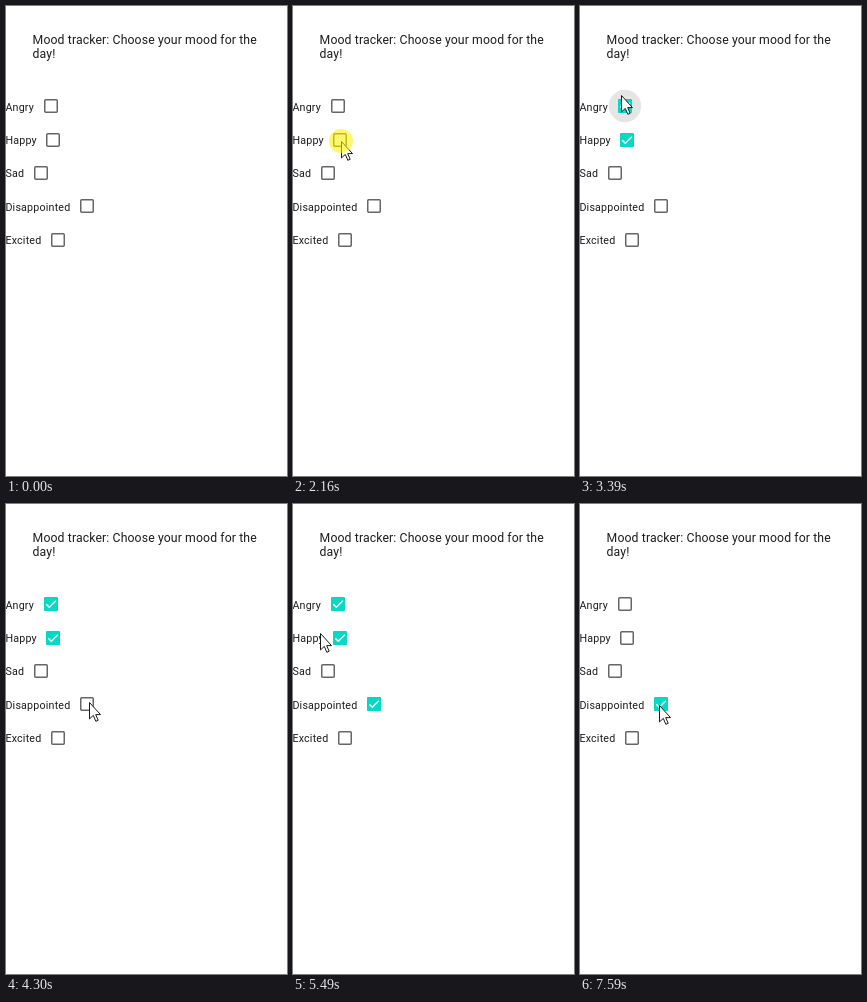
An HTML page for the animation above (8000 ms loop, 281 px wide and 470 px high).

```html
<!DOCTYPE html>
<html lang="en">
<head>
<meta charset="utf-8">
<title>Mood tracker</title>
<style>
  html, body { margin: 0; width: 100%; height: 100%; overflow: hidden; background: #fff; }
  svg { display: block; width: 281px; height: 470px; }
  text { font-family: Roboto, Arial, sans-serif; fill: #1c1c1c; }
  .title { font-size: 12.25px; letter-spacing: .009375em; }
  .label { font-size: 10.7px; letter-spacing: .01786em; }
</style>
</head>
<body>
<svg id="stage" viewBox="0 0 281 470">
  <rect width="281" height="470" fill="#fff"/>
  <text class="title" x="26.6" y="38">Mood tracker: Choose your mood for the</text>
  <text class="title" x="26.6" y="52">day!</text>
  <g id="rows"></g>
  <path id="cursor" d="M.5 .5V16.9L4.3 13.4 6.8 19.3 9.2 18.3 6.7 12.6H11.5Z"
        fill="#fff" stroke="#1a1a1a" stroke-linejoin="round"/>
  <circle id="glow" r="12" fill="#fff200" opacity=".58"/>
</svg>
<script>
const LOOP = 8000;
const PRESS = 140;        // press to toggle
const RIPPLE_END = 780;
const CHECK_LENGTH = 14;
const ROW = 33.35;

// label, checkbox centre x, press times
const moods = [
  ['Angry', 45, [3040, 5980]],
  ['Happy', 47, [2160, 6470]],
  ['Sad', 35, []],
  ['Disappointed', 81, [4510]],
  ['Excited', 52, []]
];

// time, x, y of the pointer tip; equal neighbours are rests
const path = [
  [1110, 10, 126], [1400, 57, 141], [1670, 48, 135], [2400, 48, 135],
  [2960, 41, 89], [3460, 41, 89], [3880, 58, 138], [4300, 83, 198],
  [4760, 83, 198], [5000, 66, 235], [5280, 19, 178], [5360, 18, 158],
  [5490, 27, 129], [5770, 41, 97], [6200, 41, 97], [6400, 46, 128],
  [6680, 46, 128], [7300, 84, 199], [7440, 84, 199], [7590, 79, 201],
  [8000, 79, 201]
];

const $ = id => document.getElementById(id);
const clamp = v => Math.max(0, Math.min(1, v));
const easeOut = v => 1 - (1 - clamp(v)) ** 3;

function make(parent, tag, attrs, text) {
  const el = document.createElementNS('http://www.w3.org/2000/svg', tag);
  for (const k in attrs) el.setAttribute(k, attrs[k]);
  if (text) el.textContent = text;
  return parent.appendChild(el);
}

const rows = moods.map(([name, x, presses], i) => {
  const y = Math.round(100.2 + i * ROW);
  const baseline = Math.round(104.7 + i * ROW);
  const g = make($('rows'), 'g', {});
  const ripple = make(g, 'circle', { cx: x, cy: y, r: 0, fill: '#000' });
  make(g, 'text', { class: 'label', x: -0.6, y: baseline }, name);
  const box = make(g, 'g', { transform: `translate(${x} ${y})` });
  make(box, 'rect', {
    x: -6.25, y: -6.25, width: 12.5, height: 12.5, rx: 0.9,
    fill: 'none', stroke: '#666', 'stroke-width': 1.5
  });
  const fill = make(box, 'rect', { x: -7, y: -7, width: 14, height: 14, rx: 1.5, fill: '#03dac6' });
  const check = make(box, 'path', {
    d: 'M-4.6 .4L-1.7 3.3 4.9-3.3', fill: 'none', stroke: '#fff',
    'stroke-width': 1.5, 'stroke-dasharray': CHECK_LENGTH
  });
  return { presses, ripple, fill, check };
});

function velocity(i, axis) {
  const a = path[i - 1], b = path[i], c = path[i + 1];
  if (!a || !c) return 0;
  const rest = (p, q) => p[1] === q[1] && p[2] === q[2];
  return rest(a, b) || rest(b, c) ? 0 : (c[axis] - a[axis]) / (c[0] - a[0]);
}

// cubic Hermite through the path points, on whole pixels
function pointer(t) {
  let i = 0;
  while (i < path.length - 2 && t >= path[i + 1][0]) i++;
  const a = path[i], b = path[i + 1], d = b[0] - a[0];
  const u = clamp((t - a[0]) / d), u2 = u * u, u3 = u2 * u;
  return [1, 2].map(k => Math.round(
    a[k] * (2 * u3 - 3 * u2 + 1) + b[k] * (3 * u2 - 2 * u3) +
    d * (velocity(i, k) * (u3 - 2 * u2 + u) + velocity(i + 1, k) * (u3 - u2))));
}

function drawRow({ presses, ripple, fill, check }, t) {
  const on = presses.length ? easeOut((t - presses[0] - PRESS) / 140) : 0;
  const off = presses.length > 1 ? easeOut((t - presses[1] - PRESS) / 90) : 0;
  fill.setAttribute('opacity', on * (1 - off));
  check.setAttribute('opacity', on * (1 - off));
  check.setAttribute('stroke-dashoffset', CHECK_LENGTH * (1 - on));

  const last = presses.filter(p => p <= t).pop();
  const age = last === undefined ? RIPPLE_END : t - last;
  ripple.setAttribute('r', 16.2 * easeOut((age - 40) / 225));
  ripple.setAttribute('opacity', 0.1 * clamp((RIPPLE_END - age) / 200));
}

function draw(t) {
  rows.forEach(row => drawRow(row, t));
  const [x, y] = pointer(t);
  const shown = t >= path[0][0];
  const pressed = rows.some(r => r.presses.some(p => t >= p && t < p + PRESS));
  $('cursor').setAttribute('transform', `translate(${x} ${y})`);
  $('cursor').setAttribute('visibility', shown ? 'visible' : 'hidden');
  $('glow').setAttribute('transform', `translate(${x} ${y})`);
  $('glow').setAttribute('visibility', pressed ? 'visible' : 'hidden');
}

const start = performance.now();
function tick() {
  draw((performance.now() - start) % LOOP);
  requestAnimationFrame(tick);
}
tick();
</script>
</body>
</html>
```
